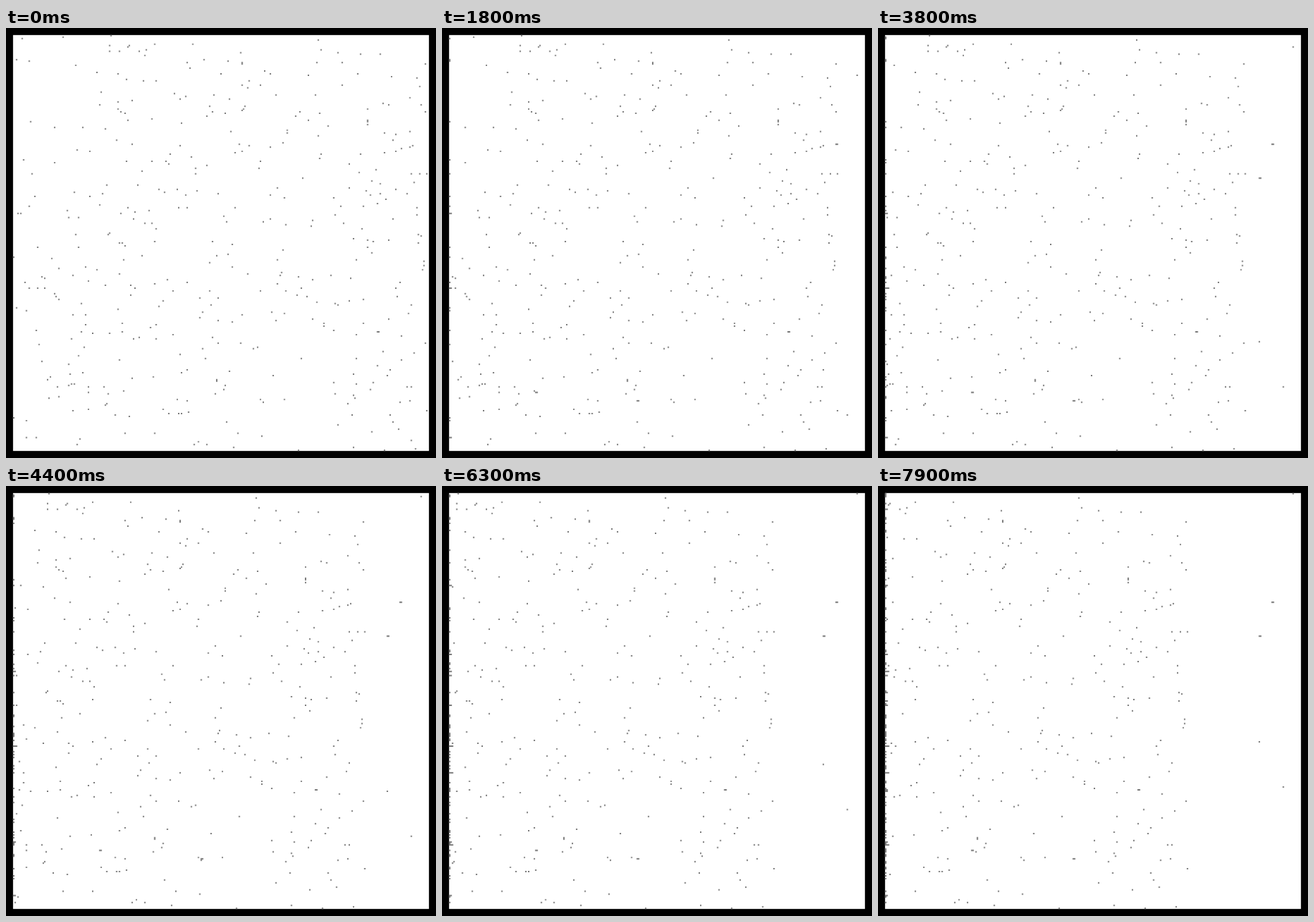
Write an HTML page that moves like this. It is 600 by 600 pixels and loops after 8 s.

```html
<!DOCTYPE html>
<html lang="en">
<head>
<meta charset="utf-8">
<title>Drifting particles</title>
<style>
  html, body { margin: 0; width: 100%; height: 100%; overflow: hidden; background: #000; }
  svg { display: block; width: 100vw; height: 100vh; }
</style>
</head>
<body>
<svg viewBox="0 0 610 610">
  <rect width="610" height="610" fill="#000"/>
  <rect x="10" y="10" width="590" height="590" fill="#fff"/>
  <path id="dots" fill="#7a7a7a"/>
</svg>
<script>
const STEP_MS = 100, STEPS = 80;
const MARGIN = 10, CELL = 2, CELLS = 295;
const DRIFTING = 430;

// Pairs that met and stopped, and dots that rise; positions in cells.
const resting = [
  { col: 274, row: 77, from: 10 },
  { col: 265, row: 101, from: 25 },
  { col: 133, row: 259, from: 8 },
  { col: 61, row: 253, from: 15 }
];
const rising = [
  { col: 289, row: 46, from: 10 },
  { col: 282, row: 287, from: 0 },
  { col: 265, row: 255, from: 18 }
];

function seeded(seed) {
  return () => {
    seed = (seed + 0x6d2b79f5) | 0;
    let n = Math.imul(seed ^ (seed >>> 15), 1 | seed);
    n = (n + Math.imul(n ^ (n >>> 7), 61 | n)) ^ n;
    return ((n ^ (n >>> 14)) >>> 0) / 4294967296;
  };
}

const random = seeded(41);
const randomCell = () => Math.floor(random() * CELLS);
const drifting = Array.from({ length: DRIFTING }, () => ({ col: randomCell(), row: randomCell() }));

// Dots in one row pile up against the left wall in order of arrival.
drifting.sort((a, b) => a.col - b.col);
const piles = new Array(CELLS).fill(0);
for (const dot of drifting) dot.stop = piles[dot.row]++;

function box(col, row, width = 1) {
  const w = width * CELL;
  return `M${MARGIN + col * CELL} ${MARGIN + row * CELL}h${w}v${CELL}h${-w}z`;
}

function picture(step) {
  const started = dot => step >= dot.from;
  return [
    ...drifting.map(({ col, row, stop }) => box(Math.max(stop, col - step), row)),
    ...resting.filter(started).map(({ col, row }) => box(col, row, 2)),
    ...rising.filter(started).map(({ col, row }) => box(col, Math.max(0, row - step)))
  ].join('');
}

const dots = document.getElementById('dots');
const start = performance.now();
let shown = -1;

function render(now) {
  const step = Math.floor(Math.max(0, now - start) / STEP_MS) % STEPS;
  if (step !== shown) {
    dots.setAttribute('d', picture(step));
    shown = step;
  }
  requestAnimationFrame(render);
}
render(start);
</script>
</body>
</html>
```
